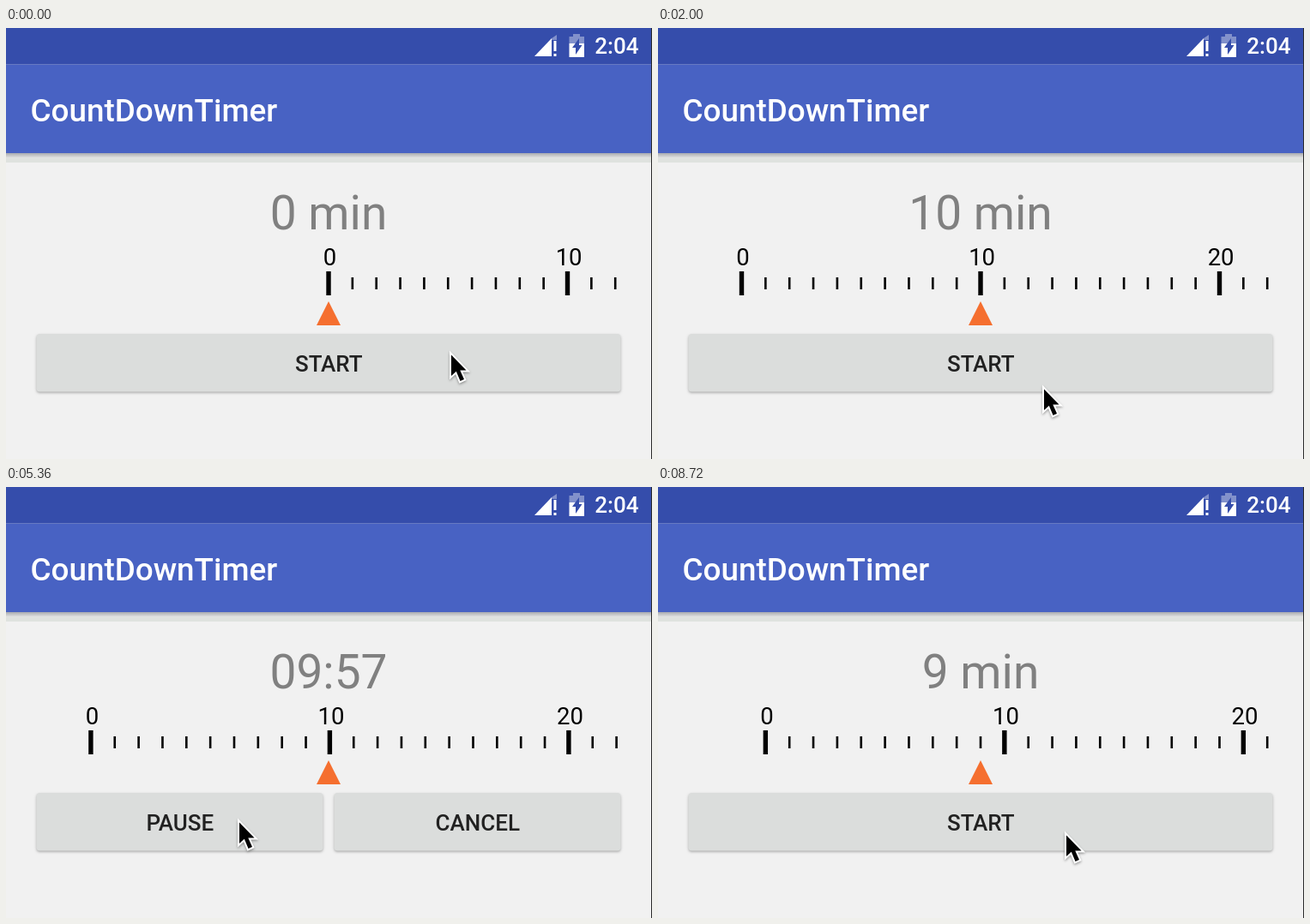
Write an HTML page with a canvas that moves like this. It is 753x503 px and loops after 8800 ms.

```html
<!DOCTYPE html>
<html lang="en">
<head>
<meta charset="utf-8">
<title>CountDownTimer</title>
<style>
html, body { margin: 0; width: 100%; height: 100%; overflow: hidden; background: #f1f1f1; }
canvas { display: block; width: 753px; height: 503px; }
</style>
</head>
<body>
<canvas id="stage" width="753" height="503"></canvas>
<script>
const ctx = document.getElementById('stage').getContext('2d');
const W = 753, H = 503, LOOP = 8800, STEP = 80;
const CENTER = 376, PITCH = 27.85;
const GRABBED = 1040, RELEASED = 1600;
const STARTED = 2800, PAUSED = 7040, CANCELLED = 8400;

// Each glide eases the pointer to a new resting place; bow bends it sideways.
const home = { x: 517, y: 379 };
const grip = { x: 481, y: 293 };
const glides = [
  { from: 0, to: 960, ...grip, bow: 44 },
  { from: GRABBED, to: RELEASED, x: 211, y: 293 },
  { from: RELEASED, to: 2000, x: 448, y: 419 },
  { from: 3880, to: 4880, x: 270, y: 389 },
  { from: PAUSED, to: 8080, x: 474, y: 404 }
];

const clamp = (v, lo, hi) => Math.min(hi, Math.max(lo, v));
const easeOut = k => 1 - (1 - k) ** 1.35;

function pointerAt(t) {
  let { x, y } = home;
  for (const glide of glides) {
    const k = clamp((t - glide.from) / (glide.to - glide.from), 0, 1);
    const e = easeOut(k);
    x += (glide.x - x) * e + (glide.bow || 0) * Math.sin(Math.PI * k);
    y += (glide.y - y) * e;
  }
  return { x, y };
}

// The ruler follows the drag, snaps to a whole minute, then counts down.
function dragged(t) {
  const x = pointerAt(clamp(t, GRABBED, RELEASED)).x;
  const minutes = (grip.x - x) / PITCH;
  return t < RELEASED ? minutes : Math.round(minutes);
}

function secondsLeft(t) {
  const ticks = Math.floor((Math.min(t, PAUSED) - STARTED + 20) / 980);
  return dragged(STARTED) * 60 - 1 - ticks;
}

function minutesAt(t) {
  if (t < STARTED) return dragged(t);
  const minutes = secondsLeft(t) / 60;
  return t < CANCELLED ? minutes : Math.floor(minutes);
}

function rect(x, y, w, h, color) {
  ctx.fillStyle = color;
  ctx.fillRect(x, y, w, h);
}

function trace(points) {
  ctx.beginPath();
  points.forEach(([x, y]) => ctx.lineTo(x, y));
  ctx.closePath();
}

function polygon(points, color) {
  trace(points);
  ctx.fillStyle = color;
  ctx.fill();
}

function roundBox(x, y, w, h, color) {
  ctx.beginPath();
  ctx.roundRect(x, y, w, h, 4);
  ctx.fillStyle = color;
  ctx.fill();
}

function text(str, x, y, size, color, weight = 400, align = 'center') {
  ctx.font = `${weight} ${size}px Roboto, sans-serif`;
  ctx.textAlign = align;
  ctx.fillStyle = color;
  ctx.fillText(str, x, y);
}

function drawStatusBar() {
  const bar = '#354dab', faint = 'rgba(255,255,255,.38)';
  rect(0, 0, W, 42.5, bar);
  polygon([[616, 33], [636, 33], [636, 12]], '#fff');
  polygon([[636, 12], [642, 8], [642, 14], [636, 14]], faint);
  rect(638.5, 15, 3, 12, '#fff');
  rect(638.5, 30, 3, 3, '#fff');
  rect(661, 7, 8, 3, faint);
  rect(656.5, 10, 17.5, 8, faint);
  rect(656.5, 18, 17.5, 16, '#fff');
  polygon([[668, 12], [660, 23], [664, 23], [664, 31], [671.5, 20], [668, 20]], bar);
  text('2:04', 737.5, 30, 26, '#fff', 500, 'right');
}

function drawToolbar() {
  const shade = ctx.createLinearGradient(0, 146, 0, 152);
  shade.addColorStop(0, '#a9abaf');
  shade.addColorStop(1, '#e6e7e6');
  rect(0, 145, W, 7, shade);
  rect(0, 152, W, 5, '#dfe2df');
  rect(0, 42.5, W, 103.5, '#4862c3');
  text('CountDownTimer', 28.5, 109, 36.85, '#fff', 500, 'left');
}

function drawRuler(minutes) {
  ctx.save();
  ctx.beginPath();
  ctx.rect(30, 240, 693, 80);
  ctx.clip();
  for (let n = 0; n <= 40; n++) {
    const x = CENTER + (n - minutes) * PITCH;
    if (n % 10) {
      rect(x - 1.3, 291, 2.6, 14, '#000');
    } else {
      rect(x - 2.7, 284, 5.4, 28, '#000');
      text(String(n), x + 1.6, 277, 27.5, '#000');
    }
  }
  ctx.restore();
  polygon([[376, 319], [390, 347], [362, 347]], '#f56f2f');
}

function drawButton(label, x, right, pressed) {
  const w = right - x;
  if (pressed) roundBox(x - 3, 354, w + 6, 79, '#dfe0df');
  ctx.save();
  ctx.shadowColor = 'rgba(0,0,0,.28)';
  ctx.shadowBlur = 3;
  ctx.shadowOffsetY = pressed ? 2 : 1.5;
  roundBox(x, 357, w, 67.5, '#dbdddc');
  ctx.restore();
  text(label, x + w / 2 + 0.3, 400.5, 26, '#212121', 500);
}

function drawButtons(t) {
  const within = (a, b) => t >= a && t < b;
  if (within(STARTED, CANCELLED)) {
    drawButton(t < PAUSED ? 'PAUSE' : 'RESUME', 35.5, 369.5, within(PAUSED - 160, PAUSED));
    drawButton('CANCEL', 382.5, 716.5, within(CANCELLED - 240, CANCELLED));
  } else {
    drawButton('START', 35.5, 716.5, within(STARTED - 240, STARTED));
  }
}

function drawPointer({ x, y }) {
  ctx.save();
  ctx.translate(x + 1, y);
  trace([[1, 2.5], [1, 27], [6.8, 21.8], [11.5, 33], [16, 31], [11.3, 20.5], [18.5, 20.5]]);
  ctx.lineWidth = 4;
  ctx.strokeStyle = '#fff';
  ctx.shadowColor = 'rgba(0,0,0,.35)';
  ctx.shadowBlur = 3;
  ctx.shadowOffsetY = 1.5;
  ctx.stroke();
  ctx.shadowColor = 'transparent';
  ctx.fillStyle = '#000';
  ctx.fill();
  ctx.restore();
}

function draw(t) {
  const minutes = minutesAt(t);
  const running = t >= STARTED && t < CANCELLED;
  const value = running ? `09:${secondsLeft(t) % 60}` : `${Math.floor(minutes)} min`;
  rect(0, 0, W, H, '#f1f1f1');
  drawToolbar();
  drawStatusBar();
  text(value, CENTER, 234.5, 55, '#808080');
  drawRuler(minutes);
  drawButtons(t);
  rect(752, 0, 1, H, '#2b2b2b');
  drawPointer(pointerAt(t));
}

const begin = performance.now();
function frame() {
  const t = (performance.now() - begin) % LOOP;
  draw(Math.floor(t / STEP) * STEP);
  requestAnimationFrame(frame);
}
frame();
</script>
</body>
</html>
```
